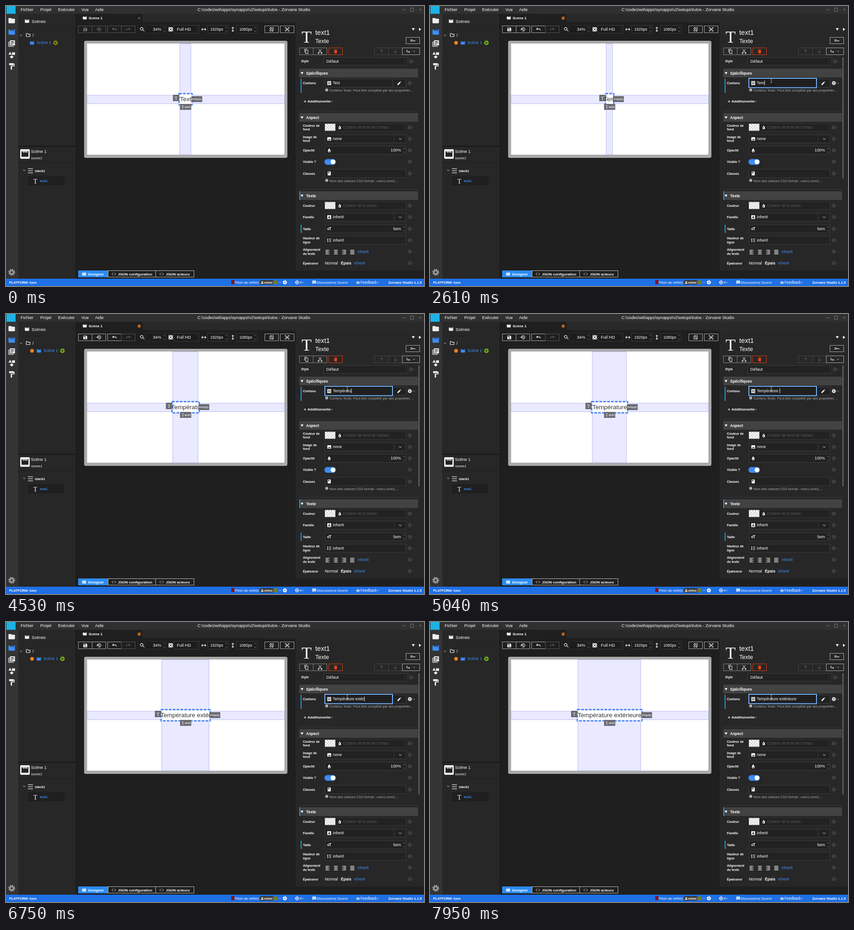
Animation of 915 by 612 pixels, one loop 8000 ms. Source, as an HTML page:

```html
<!DOCTYPE html>
<html lang="fr">
<head>
<meta charset="utf-8">
<style>
  html, body { margin: 0; height: 100%; overflow: hidden; background: #1f1f1f; }
  svg { display: block; width: 915px; height: 612px; font-family: "Liberation Sans", Arial, sans-serif; white-space: pre; }
</style>
</head>
<body>
<svg viewBox="0 0 915 612"><g id="base"></g><g id="live"></g></svg>
<script>
const LOOP = 8000, BLUE = '#3b8ef5', DIM = '#474747', EDGE = '#3d3d3d', PANEL = '#272727';
const BOLD = 'font-weight="700"', END = 'text-anchor="end"', MID = 'text-anchor="middle"';
const SERIF = 'font-family="Liberation Serif, Times, serif"';

// 24-unit icons; a leading ~ means outlined
const ICONS = {
  folder: 'M10 4H4a2 2 0 0 0-2 2v12a2 2 0 0 0 2 2h16a2 2 0 0 0 2-2V8a2 2 0 0 0-2-2h-8z',
  folderOpen: '~M3 5h7l2 3h9v11H3z',
  clap: 'M18 4l2 4h-3l-2-4h-2l2 4h-3l-2-4H8l2 4H7L5 4H4a2 2 0 0 0-2 2v12a2 2 0 0 0 2 2h16a2 2 0 0 0 2-2V4z',
  books: 'M4 6H2v14a2 2 0 0 0 2 2h14v-2H4zM8 2h14v16H6V4zM9 5v2h10V5zM9 9v2h10V9zM9 13v2h6v-2z',
  shapes: 'M7 2l5 9H2zM13 4h9v8h-9zM12 13l6 5-6 5-6-5z',
  roller: 'M18 4V2H4v6h14V6h1v4H9v12h4V12h8V4z',
  save: 'M17 3H5a2 2 0 0 0-2 2v14a2 2 0 0 0 2 2h14a2 2 0 0 0 2-2V7zM12 19a3 3 0 1 1 .01 0zM15 9H5V5h10z',
  history: '~M5 12a8 8 0 1 1 2.5 5.8M1 10l4 4 4-4M12 7v6l4 2',
  undo: '~M8 5 3 10l5 5M3 10h11a7 7 0 0 1 7 7',
  redo: '~M16 5l5 5-5 5M21 10H10a7 7 0 0 0-7 7',
  zoom: '~M10 3a6.500 6.500 0 1 0 .01 0zM15 14l7 7',
  expand: 'M2 2h20v20H2zM5 5v5l5-5zM14 5l5 5V5zM5 14v5h5zM19 14l-5 5h5zM12 8l-4 4 4 4 4-4z',
  wide: '~M2 12h20M7 7l-5 5 5 5M17 7l5 5-5 5',
  tall: '~M12 2v20M7 7l5-5 5 5M7 17l5 5 5-5',
  rotate: '~M8 3 3 8l13 13 5-5zM15 2a9 9 0 0 1 7 7M2 15a9 9 0 0 0 7 7',
  fit: '~M3 8V4h5M16 4h5v4M21 16v4h-5M8 20H3v-4M8 9h8v6H8z',
  down: '~M5 9l7 7 7-7',
  up: '~M5 15l7-7 7 7',
  x: '~M5 5l14 14M19 5 5 19',
  copy: '~M8 7h12v15H8zM4 17V2h12',
  cut: '~M6 3l12 14M18 3 6 17M5 17a3 3 0 1 0 .01 0zM19 17a3 3 0 1 0 .01 0z',
  trash: 'M5 7h14l-1 15H6zM4 3h5l1-1h4l1 1h5v2H4z',
  arrowUp: '~M12 21V4M5 11l7-7 7 7',
  arrowDown: '~M12 3v17M5 13l7 7 7-7',
  into: '~M4 3v12h15M14 10l5 5-5 5',
  key: '~M6 8a4 4 0 1 0 .01 0zM10 12h12v4M17 12v4',
  lines: 'M2 2h20v20H2zM5 6v2h14V6zM5 11v2h14v-2zM5 16v2h14v-2z',
  pen: 'M3 17v4h4L18 10l-4-4zM20 8l1-2-3-3-2 1z',
  info: 'M12 2a10 10 0 1 0 .01 0zM11 6h2v3h-2zM11 11h2v7h-2z',
  drop: 'M12 2C8 7 5 11 5 15a7 7 0 0 0 14 0C19 11 16 7 12 2zM8 15h8a4 4 0 0 1-8 0z',
  half: 'M12 2C8 7 5 11 5 15a7 7 0 0 0 14 0C19 11 16 7 12 2zM12 6v13a4 4 0 0 1-4-4c0-3 2-6 4-9z',
  image: 'M2 3h20v18H2zM5 18h14l-5-7-4 5-2-2z',
  book: 'M4 2h16v20H4zM7 4v8l3-2 3 2V4z',
  letter: 'M2 2h20v20H2zM11 5 6 19h3l1-3h4l1 3h3L13 5zM11 13l1-4 1 4z',
  size: 'M9 4h14v3h-5v13h-3V7H9zM1 10h10v3H8v7H5v-7H1z',
  height: '~M11 5h11M11 12h11M11 19h11M4 4v16M1 7l3-3 3 3M1 17l3 3 3-3',
  code: '~M8 5l-7 7 7 7M16 5l7 7-7 7',
  grid: 'M1 4h22v16H1zM9 5v6h1V5zM2 11v2h20v-2zM14 13v6h1v-6z',
  person: 'M12 3a5 5 0 1 0 .01 0zM2 22c0-11 20-11 20 0z',
  globe: '~M12 2a10 10 0 1 0 .01 0zM2 12h20M12 2c-7 6-7 14 0 20M12 2c7 6 7 14 0 20',
  chat: 'M2 2h20v16H6l-4 4zM6 6v2h12V6zM6 11v2h9v-2z',
  bug: '~M12 6a5 7 0 1 0 .01 0zM2 8l5 3M22 8l-5 3M1 14h22M3 21l5-3M21 21l-5-3M8 13h8'
};

const rect = (x, y, w, h, fill = 'none', stroke = 'none', more = '') =>
  `<rect x="${x}" y="${y}" width="${w}" height="${h}" fill="${fill}" stroke="${stroke}" ${more}/>`;
const box = (x, y, w, h, stroke = EDGE, fill = '#222') => rect(x + .5, y + .5, w - 1, h - 1, fill, stroke);
const text = (x, y, s, size = 9.3, fill = '#fff', more = '') =>
  `<text x="${x}" y="${y}" font-size="${size}" fill="${fill}" ${more}>${s}</text>`;
const path = (d, fill, more = '') => `<path d="${d}" fill="${fill}" ${more}/>`;
const dot = (x, y, r, fill) => `<circle cx="${x}" cy="${y}" r="${r}" fill="${fill}"/>`;
const play = (x, y, fill) => dot(x, y, 5, fill) + path(`M${x - 1.5} ${y - 2.5}l4 2.500-4 2.500z`, '#222');
function icon(name, x, y, size = 11, color = '#fff') {
  const d = ICONS[name], line = d[0] === '~', k = size / 24;
  const paint = line ? `stroke="${color}" stroke-width="2.4"` : 'fill-rule="evenodd"';
  return path(line ? d.slice(1) : d, line ? 'none' : color,
    `${paint} transform="translate(${x - size / 2} ${y - size / 2}) scale(${k})"`);
}
const gear = (x, y, size, color) =>
  `<g transform="translate(${x} ${y}) scale(${size / 24})" fill="none" stroke="${color}">` +
  '<circle r="6" stroke-width="5"/><circle r="9.5" stroke-width="4" stroke-dasharray="3.730"/></g>';
const options = (x, y, color) => gear(x, y, 9.5, color) + icon('down', x + 9, y, 6, color);
const spinner = (x, y, color = '#ccc') => icon('up', x, y - 4, 6, color) + icon('down', x, y + 4, 6, color);
const button = (x, y, w, h, name, color = '#ddd', edge = '#888', size = 11) =>
  box(x, y, w, h, edge, 'none') + icon(name, x + w / 2, y + h / 2, size, color);

function windowChrome() {
  let s = rect(0, 0, 915, 612, '#1f1f1f') + rect(0, 0, 915, 17, '#303030') + rect(0, 17, 27, 579, '#343434');
  s += rect(1, 0, 20, 17, '#1cb2e4');
  [['Fichier', 32], ['Projet', 75], ['Exécuter', 114], ['Vue', 165], ['Aide', 195]].forEach(([m, x]) => s += text(x, 11, m));
  s += text(419, 11, 'C:\\codes\\wit\\apps\\synapps\\v2\\setups\\tutos - Zorvane Studio');
  s += rect(867, 7.5, 8, 1, '#777') + box(885, 4, 8, 8, '#777', 'none') + icon('x', 907, 8, 9, '#777');
  ['folder', 'clap', 'books', 'shapes', 'roller'].forEach((n, i) =>
    s += icon(n, 12.5, 32 + i * 25, 17, i === 1 ? BLUE : '#eee'));
  return s + gear(12.5, 582, 16, '#999');
}

function treePanel() {
  return rect(27, 17, 125, 579, PANEL) + rect(27, 48, 125, 1, '#222') + rect(27, 305, 125, 3, '#1c1c1c') +
    icon('clap', 46, 33) + text(56, 36.5, 'Scènes') +
    icon('down', 33, 64, 8) + icon('folderOpen', 48.5, 63.5) + text(58, 67, '/') +
    rect(31, 313, 21, 21, '#eee', 'none', 'rx="2"') + icon('clap', 41.5, 323.5, 18, '#222') +
    text(54.5, 321, 'Scène 1') + text(55, 335, 'scene1', 7.5, '#fff', 'font-style="italic"') +
    rect(27, 342, 125, 1, '#1d1d1d') + icon('down', 40, 359, 8) +
    [355, 359.5, 364].map(y => rect(48, y, 11, 1.3, '#ddd')).join('') + text(63, 362.5, 'stack1', 7.2, '#fff', BOLD) +
    rect(48, 372, 80, 20, '#1f1f1f') + text(60, 388, 'T', 14, '#fff', SERIF) + text(74, 385, 'text1', 7.2, BLUE, BOLD);
}

function workArea() {
  let s = rect(152, 17, 2, 579, '#1c1c1c') + rect(299, 17, 616, 18, '#292929') +
    icon('clap', 172.5, 26, 10) + text(181, 29, 'Scène 1', 8, '#fff', BOLD);
  s += icon('zoom', 298, 51) + box(304, 42, 46, 18, '#303030', '#1c1c1c') + text(340, 54, '34%', 9.3, '#fff', END) + spinner(346, 51);
  s += icon('expand', 360.5, 51) + box(367, 42, 56, 18, EDGE, '#1c1c1c') + text(374, 54, 'Full HD') + spinner(417.5, 51, '#555');
  [['wide', 433, '1920px'], ['tall', 496.5, '1080px']].forEach(([n, x, v]) =>
    s += icon(n, x, 51, 11) + box(x + 8, 42, 46, 18, EDGE, '#1c1c1c') + text(x + 42.500, 54, v, 8.6, '#fff', END) + spinner(x + 49, 51));
  s += button(566, 43, 31, 16, 'rotate', '#fff', '#aaa') + button(600, 43, 31, 16, 'fit', '#fff', '#aaa');
  s += rect(171, 76, 445, 256, '#a9a9a9', 'none', 'rx="4"') + rect(177.5, 82, 432, 243, '#fff');
  s += rect(158, 578, 65, 15, '#2d8cf0') + box(223, 578, 105, 15, '#bbb', 'none') + box(327, 578, 85, 15, '#bbb', 'none') +
    icon('grid', 171, 586, 9) + icon('code', 236, 586, 9) + icon('code', 340.5, 586, 9);
  [['Designer', 180], ['JSON configuration', 245], ['JSON acteurs', 350]].forEach(([l, x]) => s += text(x, 589, l, 8, '#fff', BOLD));
  return s;
}

const label = (y, ...lines) => lines.map((l, i) =>
  text(650, y + 2.5 + (i - (lines.length - 1) / 2) * 8.5, l, 7, '#fff', BOLD)).join('');
const header = (y, name) => rect(642, y, 260, 19, '#424242') + path(`M645 ${y + 7.5}h6l-3 5z`, '#fff') +
  text(657, y + 12.8, name, 8.5, '#fff', BOLD);
const hint = (y, s) => icon('info', 702, y - 1, 8, '#bbb') + text(708, y + 2.500, s, 7.45, '#aaa');
const field = (y, name, value = '', w = 178) => box(698, y - 9.5, w, 19) + icon(name, 707.5, y, 10) + text(715.5, y + 2.7, value, 8.8);
const drop = y => box(849, y - 9.5, 27, 19) + icon('down', 863, y, 9);
const colour = (y, hintText) => box(698, y - 9, 178, 18, '#363636') + rect(698, y - 8, 23, 15, '#fff') +
  rect(698, y - 8, 23, 15, 'url(#checker)') + icon('half', 730.5, y, 9.5) + text(738, y + 2.7, hintText, 8.4, '#585858');
const number = (y, name, value) => field(y, name) + text(864.5, y + 2.7, value, 8.8, '#fff', END) + spinner(871.5, y);
const marker = (y, h) => rect(645, y, 2, h, '#1f9ddb');

function properties() {
  let s = rect(634, 40, 281, 538, PANEL) + rect(634, 17, 281, 23, '#292929') +
    path('M888 48.500h7l-3.500 5z', '#fff') + path('M904 47.500v7l5-3.500z', '#fff') +
    text(647, 80, 'T', 36, '#fff', SERIF) + text(677, 63, 'text1', 14.8) + text(677, 80.5, 'Texte', 12.5) +
    button(875, 68, 31, 15, 'key', '#ddd', '#aaa') +
    button(642, 91, 31, 16, 'copy') + button(672, 91, 31, 16, 'cut') + button(706, 91, 31, 16, 'trash', '#f04418', '#d93c14') +
    button(806, 91, 32, 16, 'arrowUp', '#555', '#484848') + button(837, 91, 31, 16, 'arrowDown', '#555', '#484848') +
    box(867, 91, 39, 16, '#aaa', 'none') + icon('into', 881, 99, 10) + icon('down', 893, 99, 7);
  s += text(646, 123, 'Style', 7, '#fff', BOLD) + box(695, 112, 185, 18) + text(701, 124, 'Défaut') + spinner(873.5, 121, '#555') + options(887, 121, DIM);
  s += header(137, 'Spécifiques') + marker(159, 31) + label(168.5, 'Contenu') + box(846, 159, 30, 19) + icon('pen', 861, 168.5, 11) +
    hint(184.5, 'Contenu Texte. Peut être complété par des propriétés ...') +
    text(652, 211.5, '+', 9.5, '#fff', BOLD) + text(660, 211, 'Additionnelle', 8, '#fff', BOLD) + icon('down', 713.5, 208.5, 7) + rect(642, 229, 260, 1, '#3a3a3a');
  s += header(234, 'Aspect') + label(265.5, 'Couleur de', 'fond') + colour(265.5, "Couleur de fond de l'acteur") +
    label(290.5, 'Image de', 'fond') + field(290.5, 'image', 'none', 152) + drop(290.5) +
    label(315.5, 'Opacité') + number(315.5, 'drop', '100%') +
    label(340.5, 'Visible ?') + rect(697, 334.5, 25, 12.5, '#3d8bf2', 'none', 'rx="6.250"') + dot(715.8, 340.8, 5.2, '#fff') +
    label(366, 'Classes') + field(366, 'book') + hint(382, 'Nom des classes CSS format : nom1,nom2,...') + rect(642, 400, 260, 1, '#3a3a3a');
  s += header(405, 'Texte') + rect(642, 405, 2, 19, '#1f9ddb') + label(436.5, 'Couleur') + colour(436.5, 'Couleur de la police') +
    label(461.5, 'Famille') + field(461.5, 'letter', 'inherit', 152) + drop(461.5) +
    marker(478, 18) + label(487, 'Taille') + number(487, 'size', '5em') +
    label(512, 'Hauteur de', 'ligne') + field(512, 'height', 'inherit') + label(537, 'Alignement', 'du texte');
  [0, .5, 1, null].forEach((a, i) => {
    for (let j = 0; j < 5; j++) {
      const w = a !== null && j % 2 ? 6 : 9;
      s += rect(699.5 + i * 18 + (9 - w) * (a || 0), 533 + j * 2.2, w, 1.1, '#ddd');
    }
  });
  s += text(770, 540, 'inherit', 8.8, BLUE) + label(562, 'Épaisseur') + text(698, 565, 'Normal', 8.8) +
    text(733, 565, 'Épais', 8.6, '#fff', BOLD) + text(762, 565, 'inherit', 8.8, BLUE);
  return s;
}

function statusBar() {
  return rect(0, 596, 915, 16, '#1f6fe5') + text(7, 607, 'PLATFORM: tuvo', 7.3, '#fff', BOLD) +
    rect(493, 599, 7, 9, '#8a1420') + text(501, 607, 'Plein de reflets', 7.9) +
    rect(556, 599, 29, 10, '#3c3c3c', 'none', 'rx="2"') + icon('person', 561, 604, 7) + text(565, 606.5, 'velmo', 6.5, '#fff', BOLD) +
    dot(590.5, 604, 4.5, '#7b7d22') + icon('down', 600, 604, 7) + gear(610.5, 604, 10, '#fff') +
    icon('globe', 637, 604, 9) + text(643, 607, 'fr', 8) + icon('down', 650.5, 604, 7) +
    icon('chat', 674.5, 604, 9) + text(680, 607, 'Discussions Dovrix', 8.1) +
    icon('bug', 770.5, 604, 9) + text(776, 607, 'Feedback', 8.2) + icon('down', 815, 604, 7) +
    text(910, 607, 'Zorvane Studio 1.1.5', 7.5, '#fff', BOLD + END.padStart(END.length + 1));
}

const PHRASE = 'Température extérieure';
const KEYS = [2410, 2510, 2610, 2910, 3230, 3530, 3730, 3930, 4530, 4630, 4730,
  5040, 5330, 5630, 5830, 6050, 6750, 6850, 6950, 7050, 7250, 7450];
const ROWS = [168.5, 265.5, 290.5, 315.5, 340.5, 366, 436.5, 461.5, 487, 512, 537, 562];
const keyCount = t => KEYS.filter(k => k <= t).length;
const typed = t => t < KEYS[0] ? 'Text' : PHRASE.slice(0, keyCount(t));
const pen = document.createElement('canvas').getContext('2d');
function widthOf(s, size) {
  pen.font = `${size}px "Liberation Sans", Arial, sans-serif`;
  return pen.measureText(s).width;
}

function documentState(dirty) {
  const shift = dirty ? 15 : 0, ink = dirty ? '#fff' : '#777', edge = dirty ? '#aaa' : '#555';
  return (dirty ? dot(57, 80.5, 4, '#f58220') : '') + icon('clap', 57 + shift, 80.5, 11, BLUE) +
    text(67 + shift, 83, 'Scène 1', 8.7, BLUE) + play(108.5 + shift, 80.5, dirty ? '#6cae0a' : '#85820e') +
    (dirty ? dot(291.5, 26.5, 3.5, '#b8651b') : icon('x', 291.5, 26.5, 7, '#ccc')) +
    button(158, 43, 31, 16, 'save', ink, edge) + button(188, 43, 31, 16, 'history', ink, edge) +
    button(222, 43, 31, 16, 'undo', ink, edge) + button(252, 43, 31, 16, 'redo', '#666', '#555');
}

// The selection frame follows the text with a short delay.
function stage(content, framed) {
  const w = widthOf(framed, 13.3), left = 392.6 - w / 2, right = left + w;
  const band = 'fill-opacity=".95"', tag = '#696a72', frame = '#4c86f2';
  return rect(177.5, 195, 432, 18.5, '#e8e8ff', '#b9baf0', band) + rect(left, 82.5, w, 242.5, '#e8e8ff', '#b9baf0', band) +
    rect(left - 1.5, 191.5, w + 4, 24.5, '#fff', frame, 'stroke-width="3" stroke-dasharray="6 2.500"') +
    text(393.3, 208, content, 13.5, '#333', MID) +
    rect(left - 15, 194, 13.5, 14, tag) + text(left - 8.2, 205, 'T', 10.5, '#fff', SERIF + ' ' + MID) +
    rect(right + 1.2, 197, 23.5, 13, tag) + icon('wide', right + 6, 203.5, 8) + text(right + 10, 206, 'auto', 6.8) +
    rect(381, 214, 24.5, 13, tag) + icon('tall', 387, 220.5, 8) + text(391, 223, 'auto', 6.8);
}

function contentField(t, value) {
  const focused = t >= 1510, selected = t >= 1610 && t < KEYS[0];
  const lastKey = KEYS[keyCount(t) - 1] ?? 1510;
  let s = focused ? rect(698, 158, 148, 20.5, '#1f1f1f', '#6eb0f7', 'stroke-width="2"') : box(698, 159, 149, 19);
  s += icon('lines', 707.5, 168.5, 10);
  if (t >= 1310) s += path('M745.500 159h3M747 159v8.500M745.500 167.500h3', 'none', 'stroke="#bbb" stroke-width=".9"');
  if (selected) s += rect(715.5, 163, 16, 10.5, '#a3cdf5');
  s += text(715.5, 171.2, value, 8.4, selected ? '#e4f1ff' : '#fff');
  if (focused && !selected && Math.floor((t - lastKey) / 500) % 2 === 0)
    s += rect(716 + widthOf(value, 8.4), 163, 1, 10, '#fff');
  return s;
}

function pointer(t) {
  const p = Math.max(0, Math.min(1, Math.floor((t - 690) / 103.3) / 6));
  const e = p * p * (3 - 2 * p), x = 645 + 102 * e, y = 424 - 261 * e;
  const inside = t >= 690;
  let s = ROWS.map(r => options(884, r, inside && Math.abs(r - y) < 11 ? '#fff' : DIM)).join('');
  if (inside) s += rect(902.5, 112, 3, 265, '#5a5a5a');
  if (inside && t < 1310) s += path(`M${x} ${y}v13l3-2.500 2 5 2-1-2-4.500h4z`, '#fff', 'stroke="#111" stroke-width=".7"');
  return s;
}

const base = document.getElementById('base'), live = document.getElementById('live');
base.innerHTML = '<defs><pattern id="checker" width="6" height="6" patternUnits="userSpaceOnUse">' +
  '<path d="M0 0h3v3H0zM3 3h3v3H3z" fill="#d4d4d4"/></pattern></defs>' +
  windowChrome() + treePanel() + workArea() + properties() + statusBar();

const start = performance.now();
let shown = '';
function draw() {
  const t = (performance.now() - start) % LOOP;
  const value = typed(t);
  const picture = documentState(t >= 2510) + stage(value.trimEnd(), typed(t - 100).trimEnd()) + contentField(t, value) + pointer(t);
  if (picture !== shown) live.innerHTML = shown = picture;
  requestAnimationFrame(draw);
}
draw();
</script>
</body>
</html>
```
